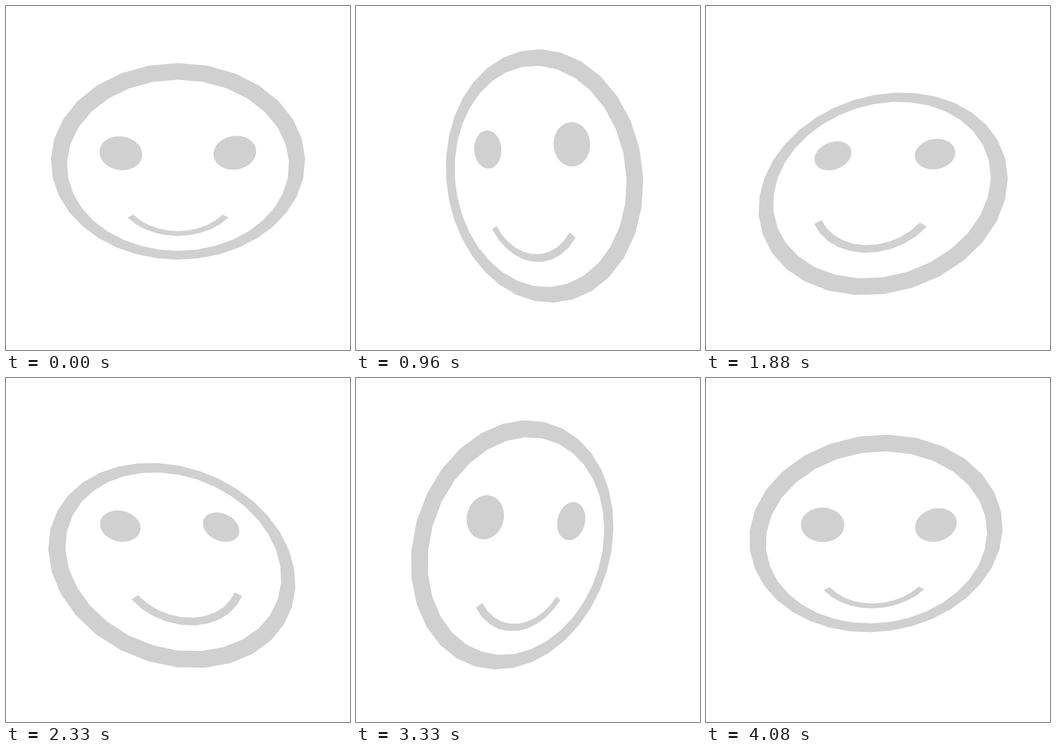
Recreate the animation shown at these times as an HTML page. Size 748 by 748 pixels, loop 4.21 s.

```html
<!DOCTYPE html>
<html lang="en">
<head>
<meta charset="utf-8">
<title>Wobbling smiley</title>
<style>
  html, body { margin: 0; width: 100%; height: 100%; overflow: hidden; background: #fff; }
  svg { display: block; width: 100%; height: 100%; }
</style>
</head>
<body>
<svg viewBox="0 0 748 748"><path id="face" fill="#d0d0d0" fill-rule="evenodd"/></svg>
<script>
const LOOP = 4210, FPS = 24, LAST = 98, TURN = 100;
const MID = 374, DEPTH = 1038.9;   // view centre and camera distance
const TILT = 0.85;                 // tangent of the largest lean
const SEG = Math.PI / 16;          // rings are 32-sided
const face = document.getElementById('face');

// Points on a circle in the face plane, v pointing up; step 0 is the top.
function arc(u, v, r, from, to, step = SEG) {
  const pts = [];
  for (let i = from; i <= to; i++) {
    pts.push([u + r * Math.sin(i * step), v + r * Math.cos(i * step)]);
  }
  return pts;
}

const eye = (u, v) => arc(u, v, 44.3, 0, 95, Math.PI / 48);

const shapes = [
  arc(0, 0, 272.4, 0, 31),
  arc(0, 0, 238.8, 0, 31),
  eye(-119, 66.3),
  eye(118.3, 67.6),
  [...arc(0, -42.4, 142, 11, 21), ...arc(0, -42.4, 125, 11, 21).reverse()]
];

// The face looks at a point that travels round a circle in front of it.
function outline(step) {
  const phase = 2 * Math.PI * step / TURN;
  const yaw = Math.atan(TILT * Math.sin(phase));
  const pitch = Math.asin(TILT / Math.hypot(1, TILT) * Math.cos(phase));
  const sy = Math.sin(yaw), cy = Math.cos(yaw);
  const sp = Math.sin(pitch), cp = Math.cos(pitch);

  const project = ([u, v]) => {
    const scale = DEPTH / (DEPTH - u * sy - v * sp * cy);
    const x = MID + (u * cy - v * sp * sy) * scale;
    const y = MID - v * cp * scale;
    return x.toFixed(2) + ' ' + y.toFixed(2);
  };
  return shapes.map(pts => 'M' + pts.map(project).join('L') + 'Z').join('');
}

// Step times are rounded to hundredths of a second.
const startOf = n => Math.round(n * 100 / FPS) * 10;

function stepAt(t) {
  let n = Math.floor(t * FPS / 1000) + 1;
  while (startOf(n) > t) n--;
  return Math.min(n, LAST);
}

let shown = -1;
function draw(now) {
  const step = stepAt(Math.max(0, now - start) % LOOP);
  if (step !== shown) {
    face.setAttribute('d', outline(step));
    shown = step;
  }
}

function tick() {
  draw(performance.now());
  requestAnimationFrame(tick);
}

const start = performance.now();
tick();
</script>
</body>
</html>
```
